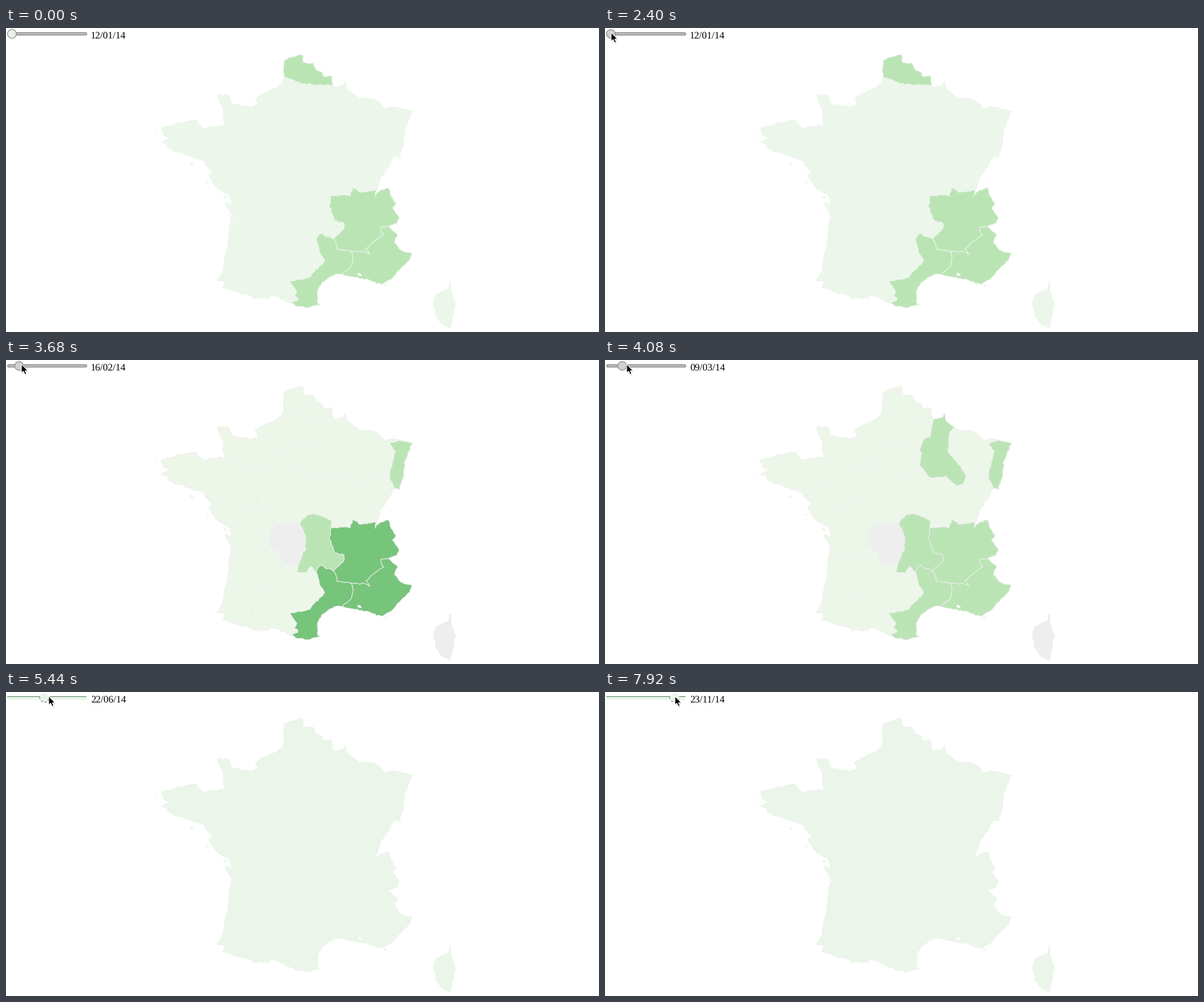
These frames come from a looping animation (958 px wide and 492 px high, 8 s). A matplotlib script:

```python
import numpy as np
import matplotlib.pyplot as plt
from matplotlib.animation import FuncAnimation
from matplotlib.patches import Arc, Circle, Ellipse, FancyBboxPatch, Polygon, Rectangle

W, H, DPI = 958, 492, 100
FRAMES, STEP = 100, 80
PX = 72 / DPI  # one pixel in points
plt.rcParams["text.hinting"] = "no_hinting"
rng = np.random.default_rng(14)

# Points where borders meet, and each region as a ring of such points
NODES = dict(
    A=(449, 79), a=(479, 43), B=(528, 93), C=(531, 96), D=(564, 109), K=(637, 130),
    L=(627, 208), M=(598, 263), N=(618, 321), O=(543, 399), P=(461, 446), k=(391, 432),
    b=(377, 319), d=(361, 271), f=(322, 222), g=(354, 160), h=(407, 124), i=(446, 90),
    G=(508, 144), H=(508, 170), I=(496, 181), J=(570, 204), E=(584, 187), F=(620, 190),
    j=(450, 137), m=(446, 150), l=(428, 160), n=(427, 178), o=(367, 167), e=(405, 231),
    p=(436, 266), Z=(424, 299), Y=(447, 330), X=(472, 333), W=(475, 264), V=(498, 248),
    T=(525, 272), U=(574, 266), Q=(501, 343), R=(529, 342), S=(557, 361),
    c=(718, 410), q=(718, 486), r=(691, 441))
REGIONS = dict(
    NPC="AaB", PIC="ABCGji", HN="ijmlh", BN="hlnog", BRE="gof", PDL="foned",
    CEN="lmIVWpen", IDF="jGHIm", CHA="CDEJHG", LOR="DKFE", ALS="KLF", FC="LMUJEF",
    BOU="HJUTVI", AUV="VTRQXW", RA="UMNSRT", PACA="NOS", LR="OPQRS", MP="PkYXQ",
    AQ="kbZY", POI="bdepZ", LIM="pWXYZ", COR="cqr")
borders = {}


def roughen(pts, step=4, size=0.7):
    """Cut a line into short steps and shake the inner ones."""
    out = [pts[:1]]
    for p, q in zip(pts, pts[1:]):
        n = max(1, round(np.hypot(*(q - p)) / step))
        out.append(p + (q - p) * np.arange(1, n + 1)[:, None] / n)
    line = np.vstack(out)
    line[1:-1] += rng.normal(0, size, line[1:-1].shape).clip(-1.5, 1.5)
    return line


def via(ends, *xy):
    """Lay a border between two nodes through a few key points."""
    inner = np.reshape(xy, (-1, 2))
    borders[ends] = roughen(np.vstack([NODES[ends[0]], inner, NODES[ends[1]]]))


def border(p, q):
    if q + p in borders:
        return borders[q + p][::-1]
    if p + q not in borders:
        via(p + q)
    return borders[p + q]


def outline(ring):
    return np.vstack([border(p, q) for p, q in zip(ring, ring[1:] + ring[0])])


# Coast and frontier, clockwise from the north
via("Aa", 448, 53, 461, 47)
via("aB", 481, 55, 495, 57, 502, 68, 511, 71, 513, 79, 526, 78)
via("CD", 545, 93, 548, 85, 552, 101)
via("DK", 571, 113, 597, 116, 612, 130, 625, 127)
via("KL", 657, 134, 645, 163, 640, 195, 636, 209)
via("LM", 619, 223, 608, 237)
via("MN", 596, 271, 605, 262, 618, 259, 622, 272, 630, 284, 625, 291, 635, 306, 632, 316)
via("NO", 632, 334, 628, 346, 637, 360, 657, 364, 649, 380, 638, 388, 626, 404, 607, 415,
    583, 407, 555, 402)
via("OP", 534, 397, 510, 412, 503, 425, 503, 445, 508, 448, 487, 453, 470, 451)
via("Pk", 436, 434, 426, 433, 423, 438, 400, 437)
via("kb", 376, 428, 351, 420, 353, 411, 341, 408, 350, 395, 358, 350, 363, 304)
via("bd", 363, 301, 354, 283, 365, 287)
via("df", 346, 262, 337, 256, 328, 238, 335, 235)
via("fg", 319, 214, 302, 209, 262, 195, 261, 188, 250, 185, 264, 179, 252, 169, 251, 162,
    283, 153, 307, 149, 318, 163, 347, 157)
via("gh", 351, 140, 350, 128, 341, 108, 360, 109, 364, 122, 395, 129)
via("hi", 403, 113, 438, 96)
via("cq", 719, 424, 726, 448)
via("qr", 704, 479, 694, 464)
via("rc", 695, 432, 714, 422)

# Inner borders that bend; all others run straight
via("AB", 463, 84, 478, 90, 498, 92)
via("CG", 527, 110, 526, 124, 516, 128)
via("Gj", 495, 138)
via("ij", 455, 101, 454, 124)
via("hl", 411, 131, 414, 150)
via("no", 414, 169, 385, 170)
via("fo", 343, 207, 362, 199)
via("ne", 428, 184, 410, 209)
via("ed", 375, 239, 381, 266)
via("mI", 455, 164, 463, 174, 478, 177, 482, 184)
via("GH", 511, 152)
via("DE", 556, 118, 555, 148)
via("EJ", 578, 201)
via("JH", 558, 195, 551, 189, 524, 190)
via("KF", 620, 135, 629, 148, 621, 178)
via("UJ", 577, 250, 575, 215)
via("UM", 586, 264)
via("UT", 561, 258, 556, 271, 543, 270)
via("TV", 526, 260)
via("IV", 493, 205, 497, 230)
via("VW", 486, 251)
via("ep", 424, 241, 430, 255)
via("pZ", 428, 276)
via("Zb", 412, 314, 397, 327)
via("ZY", 442, 312)
via("XW", 484, 304, 484, 284)
via("TR", 523, 290, 532, 312, 546, 315, 546, 324)
via("RQ", 524, 337, 516, 339, 510, 332, 503, 336)
via("QX", 493, 334, 485, 345, 470, 344)
via("RS", 536, 358)
via("SN", 580, 362, 588, 366, 582, 356, 609, 334, 605, 322)
via("SO", 561, 372, 557, 388)
via("PQ", 473, 438, 466, 434, 469, 426, 458, 410, 490, 403, 514, 377, 506, 362)
via("kY", 399, 404, 393, 384, 424, 373, 438, 345)

ISLANDS = [(241, 165, 4), (248, 185, 3), (300, 221, 7), (325, 250, 5), (354, 274, 7),
           (613, 417, 6)]

# Activity levels in three key weeks; the weeks between are interpolated
GREENS = ["#edf7e9", "#bbe4b5", "#77c47b", "#38a157", "#0b6b2f"]
KEY_WEEKS = (0, 2, 8, 11)
START = dict.fromkeys("NPC RA PACA LR".split(), 1)
PEAK = dict.fromkeys("NPC LOR ALS IDF CEN AUV AQ MP".split(), 1) | dict(LR=2, PACA=3, RA=4)
DECLINE = dict.fromkeys("CHA ALS AUV RA PACA LR".split(), 1)
NO_DATA, GREY = ("LIM", "COR"), "#eeeeee"
FIRST_PALE, LAST_PALE, DARK = "#ecf6eb", "#ebf5ea", "#55805c"
FLAT_WEEK = KEY_WEEKS[-1]

# Pointer: three eased glides, then a drag along the slider
ENTER, PRESS = 240, 2400
GLIDES = [(240, 560, (125, 238)), (800, 1520, (11, 9)), (1920, 2160, (10, 7.5))]
DRAG_T = (2640, 3360, 4080, 5280, 5440, 7920)
DRAG_WEEK = (0, 2, 8, 23, 23, 45)
DRAG_X = (10, 17, 35, 66, 69, 113)
ARROW = np.array([(0, 0), (0, 14), (3.2, 11), (5.6, 16.4), (8.1, 15.3), (5.8, 10.3), (10.2, 10)])

fig = plt.figure(figsize=(W / DPI, H / DPI), dpi=DPI, facecolor="white")
ax = fig.add_axes([0, 0, 1, 1])
ax.set_xlim(0, W)
ax.set_ylim(H, 0)
ax.axis("off")


def add(patch, z):
    patch.set_zorder(z)
    return ax.add_patch(patch)


shapes = {code: add(Polygon(outline(ring), lw=PX, joinstyle="round"), 1)
          for code, ring in REGIONS.items()}
islands = [add(Ellipse((x, y), w, w / 2, angle=25, lw=0), 1) for x, y, w in ISLANDS]
add(Ellipse((571, 399), 7, 4, angle=25, fc="white", lw=0), 2)

track = add(FancyBboxPatch((4.5, 9.5), 124, 0.1, boxstyle="round,pad=2,rounding_size=2",
                           fc="#bcbcbc", ec="#7c7c7c", lw=PX), 3)
flat_track = [add(Rectangle((2.5, 8), 128, 4.5, fc=LAST_PALE, lw=0), 3),
              add(Rectangle((2.5, 7), 128, 1, fc=DARK, lw=0), 3)]
thumb = add(Circle((9.5, 9.5), 7, lw=PX), 4)
dashes = add(Arc((9.5, 9.5), 14, 14, theta1=15, theta2=165, color="#4a5a4c", lw=PX,
                 linestyle=(0, (3, 3))), 5)
notch = add(Rectangle((0, 7), 1, 4, fc=DARK, lw=0), 5)
label = ax.text(137, 17, "", family="Liberation Serif", size=16 * PX, color="black",
                va="baseline", zorder=4)
shadow = add(Polygon(ARROW, fc="black", alpha=0.12, lw=0), 6)
pointer = add(Polygon(ARROW, fc="black", ec="white", lw=PX), 7)


def level(code, week):
    keys = [stage.get(code, 0) for stage in (START, PEAK, DECLINE)] + [0]
    return round(np.interp(week, KEY_WEEKS, keys))


def paint_map(week):
    mixed = 0 < week < FLAT_WEEK
    pale = GREENS[0] if mixed else FIRST_PALE if week == 0 else LAST_PALE
    for code, shape in shapes.items():
        n = level(code, week)
        missing = mixed and code in NO_DATA
        shape.set_facecolor(GREY if missing else GREENS[n] if n else pale)
        shape.set_edgecolor(GREY if mixed else pale)
    for shape in islands:
        shape.set_facecolor(pale)


def paint_slider(week, pressed):
    flat = week >= FLAT_WEEK
    x = 9.5 + 2.288 * week
    thumb.center = dashes.center = (x, 9.5)
    thumb.set_facecolor(LAST_PALE if flat else "#d0d0d0" if pressed else "#eaf3e9")
    thumb.set_edgecolor(LAST_PALE if flat else "#7f7f7f")
    notch.set_x(x - 8)
    track.set_visible(not flat)
    for part in (*flat_track, dashes, notch):
        part.set_visible(flat)


def pointer_tip(t):
    if t > DRAG_T[0]:
        return np.array([np.interp(t, DRAG_T, DRAG_X), 7])
    tip = np.array([455.0, 472.0])
    for begin, end, goal in GLIDES:
        u = np.clip((t - begin) / (end - begin), 0, 1)
        tip += (goal - tip) * u * u * (3 - 2 * u)
    return tip


def draw(i):
    t = i * STEP
    week = int(np.interp(t, DRAG_T, DRAG_WEEK) + 0.5)
    paint_map(week)
    paint_slider(week, t >= PRESS)
    year, month, day = str(np.datetime64("2014-01-12") + 7 * week).split("-")
    label.set_text(f"{day}/{month}/{year[2:]}")
    tip = pointer_tip(t)
    pointer.set_xy(ARROW + tip)
    shadow.set_xy(ARROW + tip + [1, 2])
    for part in (pointer, shadow):
        part.set_visible(t >= ENTER)
    return []


anim = FuncAnimation(fig, draw, frames=FRAMES, interval=STEP, repeat=True, repeat_delay=0)
plt.show()
```
